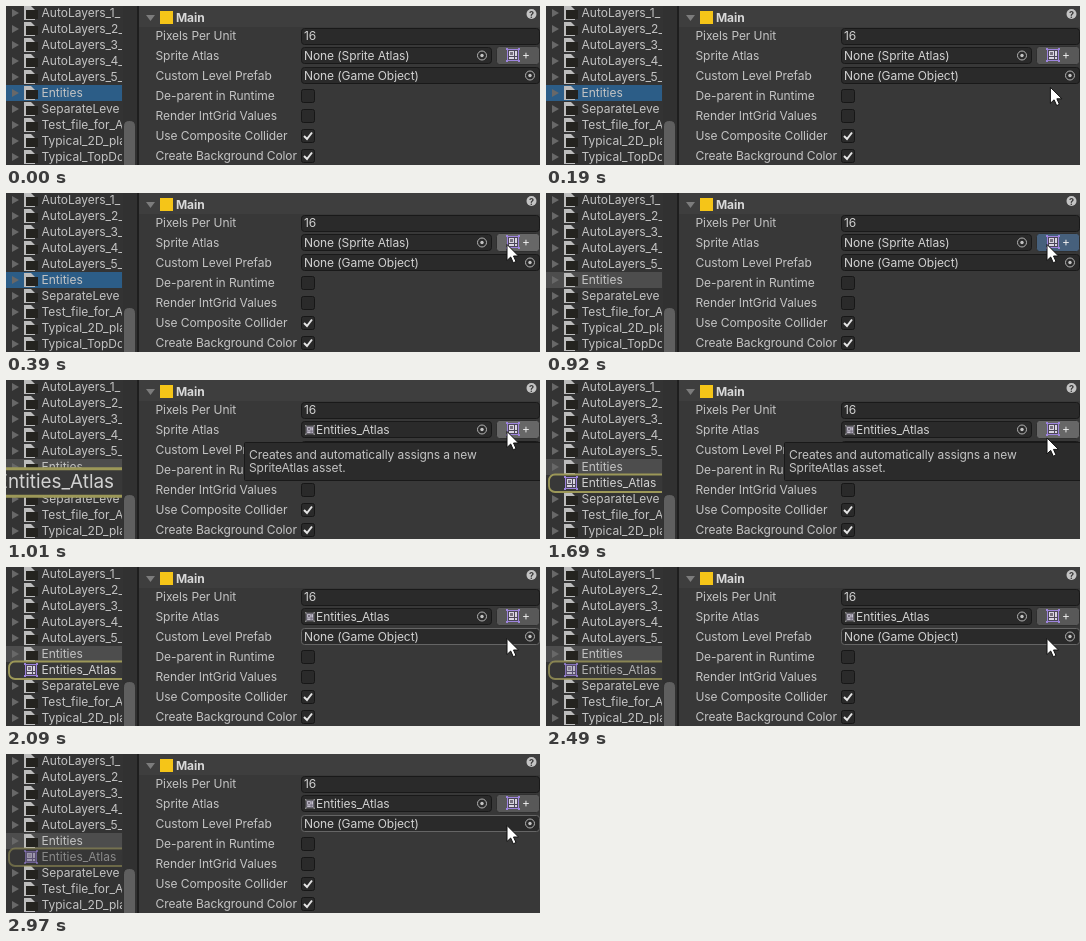
An HTML page with a canvas that plays this animation: 534 px wide and 159 px high, repeating every 3.04 s.

```html
<!DOCTYPE html>
<html lang="en">
<head>
<meta charset="utf-8">
<style>
  html, body { margin: 0; width: 100%; height: 100%; overflow: hidden; background: #383838; }
  canvas { display: block; }
</style>
</head>
<body>
<canvas id="stage" width="534" height="159"></canvas>
<script>
const ctx = document.getElementById('stage').getContext('2d');
const LOOP = 3040, PRESS = 790, CREATED = 950, SETTLED = 1110, LEAVE = 1690, FADE = 2090;
const LIST_W = 116, ROW = 16;
const files = ['AutoLayers_1_', 'AutoLayers_2_', 'AutoLayers_3_', 'AutoLayers_4_', 'AutoLayers_5_',
  'Entities', 'SeparateLeve', 'Test_file_for_A', 'Typical_2D_pla', 'Typical_TopDo'];
const labels = ['Pixels Per Unit', 'Sprite Atlas', 'Custom Level Prefab', 'De-parent in Runtime',
  'Render IntGrid Values', 'Use Composite Collider', 'Create Background Color'];

const clamp = v => Math.max(0, Math.min(1, v));
const progress = (t, from, to) => clamp((t - from) / (to - from));
const mix = (a, b, k) => a + (b - a) * k;

function rect(x, y, w, h, color) {
  ctx.fillStyle = color;
  ctx.fillRect(x, y, w, h);
}

function box(x, y, w, h, fill, stroke, radius = 3) {
  ctx.beginPath();
  ctx.roundRect(x + .5, y + .5, w - 1, h - 1, radius);
  ctx.fillStyle = fill;
  ctx.fill();
  ctx.strokeStyle = stroke;
  ctx.lineWidth = 1;
  ctx.stroke();
}

function text(str, x, y, { color = '#c4c4c4', weight = 400, spacing = -.08 } = {}) {
  ctx.font = `${weight} 12px Inter, sans-serif`;
  ctx.letterSpacing = `${spacing}px`;
  ctx.fillStyle = color;
  ctx.fillText(str, x, y);
}

function poly(points, color) {
  ctx.beginPath();
  points.forEach(([x, y]) => ctx.lineTo(x, y));
  ctx.closePath();
  ctx.fillStyle = color;
  ctx.fill();
}

function disc(x, y, r, color) {
  ctx.beginPath();
  ctx.arc(x, y, r, 0, 7);
  ctx.fillStyle = color;
  ctx.fill();
}

function clipped(x, y, w, h, draw) {
  ctx.save();
  ctx.beginPath();
  ctx.rect(x, y, w, h);
  ctx.clip();
  draw();
  ctx.restore();
}

function atlasIcon(x, y, size, frame = '#9d84dc') {
  ctx.save();
  ctx.translate(x, y);
  ctx.scale(size / 14, size / 14);
  rect(1, 1, 12, 12, frame);
  rect(2, 2, 10, 10, '#4c4658');
  rect(3, 3, 5, 5, '#d8d4e0');
  rect(4, 4, 3, 3, '#77707f');
  rect(9, 3, 2, 5, '#d8d4e0');
  rect(3, 9, 5, 2, '#d8d4e0');
  rect(9, 9, 2, 2, '#d8d4e0');
  for (const i of [0, 12]) for (const j of [0, 12]) rect(i, j, 2, 2, frame);
  ctx.restore();
}

function fileRow(name, y) {
  poly([[6, y - 4], [13, y], [6, y + 4]], '#686868');
  poly([[18, y - 7], [25, y - 7], [29, y - 3], [29, y + 7], [18, y + 7]], '#bcbcbc');
  rect(20, y - 3, 12, 9, '#24231f');
  text(name, 35.5, y + 4, { spacing: 0 });
}

function ping(t) {
  const zoom = 1 + .75 * (1 - Math.abs(progress(t, CREATED, SETTLED) * 2 - 1));
  const clock = t > 2490 && t < 2620 ? 2490 : t;
  ctx.save();
  ctx.translate(114, 104.5);
  ctx.scale(zoom, zoom);
  ctx.translate(-114, -104.5);
  ctx.globalAlpha = 1 - Math.max(0, clock - FADE) / 1900;
  ctx.beginPath();
  ctx.roundRect(3, 94.5, 304, 17.5, 6);
  ctx.fillStyle = '#383838';
  ctx.fill();
  ctx.strokeStyle = '#9c9858';
  ctx.lineWidth = 1.8;
  ctx.stroke();
  atlasIcon(18, 96, 14);
  text('Entities_Atlas', 35.5, 107, { color: '#d2d2d2', spacing: 0 });
  ctx.restore();
}

function projectList(t) {
  const created = t >= CREATED;
  rect(0, 0, 131, 159, '#333333');
  rect(117, 0, 14, 159, '#313131');
  box(118, 115, 11, 60, '#5f5f5f', '#5f5f5f', 4);
  rect(131, 0, 2, 159, '#1e1e1e');
  clipped(0, 0, LIST_W, 159, () => {
    rect(0, 79, LIST_W, ROW, t < PRESS ? '#2c5d87' : '#4d4d4d');
    files.forEach((name, i) => fileRow(name, 7 + ROW * (i + (created && i > 5))));
    if (created) ping(t);
  });
}

function picker(x, y) {
  ctx.beginPath();
  ctx.arc(x, y, 4.5, 0, 7);
  ctx.strokeStyle = '#b4b4b4';
  ctx.lineWidth = 1;
  ctx.stroke();
  disc(x, y, 1.7, '#c4c4c4');
}

function checkbox(y, on) {
  box(295, y - 7, 14, 14, '#2a2a2a', '#171717', 2);
  if (!on) return;
  ctx.beginPath();
  ctx.moveTo(298, y);
  ctx.lineTo(301, y + 3);
  ctx.lineTo(306, y - 3.5);
  ctx.strokeStyle = '#e4e4e4';
  ctx.lineWidth = 2;
  ctx.stroke();
}

function inspector(t, mouse) {
  const value = { color: '#d2d2d2' };
  const inside = (x, y, w, h) => mouse && mouse.x >= x && mouse.x < x + w && mouse.y >= y && mouse.y < y + h;
  const field = (y, w) => box(295, y, w, 17, '#2a2a2a', inside(295, y, w, 17) ? '#656565' : '#191919');

  rect(133, 0, 401, 159, '#383838');
  rect(133, 0, 401, 21, '#3e3e3e');
  poly([[140, 9], [149, 9], [144.5, 15]], '#7c7c7c');
  rect(154, 5, 13, 13, '#f5c518');
  text('Main', 170, 16, { color: '#d8d8d8', weight: 700 });
  disc(525.5, 8, 5, '#c4c4c4');
  ctx.font = '700 9px Inter, sans-serif';
  ctx.fillStyle = '#383838';
  ctx.fillText('?', 523, 11.5);

  clipped(133, 0, 160, 159, () => labels.forEach((s, i) => text(s, 149.5, 34 + 20 * i)));
  field(22, 239);
  text('16', 298, 34, value);
  field(41, 191);
  if (t >= CREATED) {
    atlasIcon(299, 45, 10, '#8c8c8c');
    text('Entities_Atlas', 310, 54, value);
  } else {
    text('None (Sprite Atlas)', 298, 54, value);
  }
  picker(476, 49.5);
  field(61, 239);
  text('None (Game Object)', 298, 74, value);
  picker(524, 69.5);

  const pressed = t >= PRESS && t < CREATED;
  const hover = inside(490, 40, 44, 19);
  box(490, 40, 44, 19, pressed ? '#46607c' : hover ? '#676767' : '#585858', '#303030');
  atlasIcon(500, 42, 14);
  text('+', 516, 53, { color: '#eeeeee' });

  for (let i = 0; i < 4; i++) checkbox(90 + 20 * i, i > 1);
}

function tooltip() {
  box(238, 62, 300, 39, '#2b2b2b', '#191919', 1);
  text('Creates and automatically assigns a new', 243, 79);
  text('SpriteAtlas asset.', 243, 92);
}

function mouseAt(t) {
  if (t < 30) return null;
  const enter = 1 - (1 - progress(t, 0, 390)) ** 2;
  const leave = progress(t, LEAVE - 60, 1820);
  return { x: mix(514, 501, enter), y: mix(166, 51.5, enter) + (t < LEAVE ? 0 : 20 * leave) };
}

function cursor({ x, y }) {
  const shape = [[0, 0], [0, 16], [3.7, 12.5], [6.3, 18.3], [9, 17], [6.5, 11.5], [11.5, 11.5]];
  poly(shape.map(([dx, dy]) => [x + dx, y + dy]), '#ffffff');
  ctx.strokeStyle = '#111111';
  ctx.lineWidth = 1;
  ctx.stroke();
}

function draw(now) {
  const t = now % LOOP;
  const mouse = mouseAt(t);
  inspector(t, mouse);
  projectList(t);
  if (t >= 990 && t < 1720) tooltip();
  if (mouse) cursor(mouse);
  requestAnimationFrame(draw);
}
requestAnimationFrame(draw);
</script>
</body>
</html>
```
